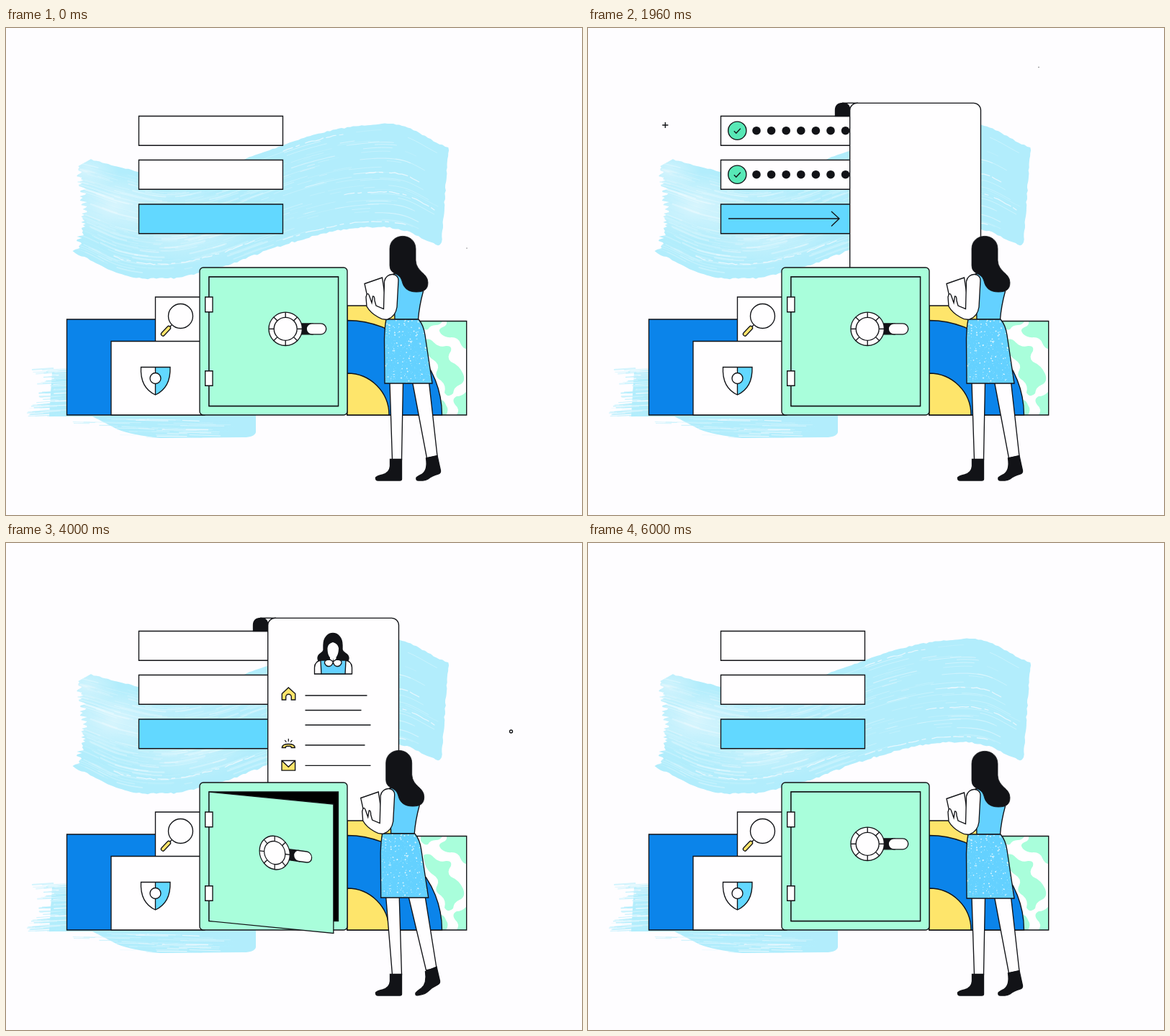
Recreate the animation shown at these times as an HTML page with a canvas. Size 800 by 677 pixels, loop 6040 ms.

```html
<!DOCTYPE html>
<html lang="en">
<head>
<meta charset="utf-8">
<title>Safe deposit</title>
<style>
html, body { margin: 0; width: 100%; height: 100%; overflow: hidden; background: #fefdff; }
canvas { display: block; }
</style>
</head>
<body>
<canvas id="stage" width="800" height="677"></canvas>
<script>
const LOOP = 6040, TAU = Math.PI * 2;
const INK = '#121317', WHITE = '#fffeff', PAGE = '#fefdff', MINT = '#a9fedb', BLUE = '#0b84ea',
      SKY = '#62d8ff', DRESS = '#64d1ff', YELLOW = '#fee56b', WASH = '#b2edfc';
const stage = document.getElementById('stage');
let c = stage.getContext('2d');

// Easing: progress between two times, smoothed
const span = (t, a, b) => Math.min(1, Math.max(0, (t - a) / (b - a)));
const ease = (t, a, b) => {
  const p = span(t, a, b);
  return p < .5 ? 4 * p ** 3 : 1 - 4 * (1 - p) ** 3;
};
const easeOut = (t, a, b) => 1 - (1 - span(t, a, b)) ** 3;

let seed = 7;
const rnd = () => (seed = seed * 16807 % 2147483647) / 2147483647;

function paint(path, fill, line = INK, width = 1.35) {
  const p = typeof path === 'string' ? new Path2D(path) : path;
  if (fill) { c.fillStyle = fill; c.fill(p); }
  if (line) { c.strokeStyle = line; c.lineWidth = width; c.stroke(p); }
}
function box(x, y, w, h, fill, r = 0, line = INK) {
  const p = new Path2D();
  p.roundRect(x, y, w, h, r);
  paint(p, fill, line);
}
function disc(x, y, r, fill, line = INK) {
  const p = new Path2D();
  p.arc(x, y, Math.max(0, r), 0, TAU);
  paint(p, fill, line);
}
function group(draw, x = 0, y = 0, sx = 1, sy = sx) {
  c.save();
  c.translate(x, y);
  c.scale(sx, sy);
  draw();
  c.restore();
}

// Smooth curve through evenly spaced heights
const curve = ys => x => {
  const u = Math.min(7.999, Math.max(0, (x - 95) / 65)), i = Math.floor(u), f = u - i;
  const b = ys[i], d = ys[i + 1], a = ys[i - 1] ?? b, e = ys[i + 2] ?? d;
  return b + .5 * f * (d - a + f * (2 * a - 5 * b + 4 * d - e + f * (3 * (b - d) + e - a)));
};
const ribbonTop = curve([178, 193, 207, 195, 173, 150, 136, 135, 165]);
const ribbonEnd = curve([312, 341, 347, 334, 311, 290, 277, 279, 308]);

// Line that follows the ribbon at depth v, 0 at its top and 1 at its bottom
function along(v, x0, x1, wobble = 0) {
  const p = new Path2D();
  for (let x = x0; x < x1; x += 5) {
    const a = ribbonTop(x), b = ribbonEnd(x);
    p.lineTo(x, a + (b - a) * v + rnd() * wobble);
  }
  return p;
}

function brushLayer() {
  const layer = new OffscreenCanvas(800, 677), main = c;
  c = layer.getContext('2d');

  const ribbon = new Path2D();
  for (let x = 118; x <= 612; x += 4) ribbon.lineTo(x, ribbonTop(x) + rnd() * 1.5);
  for (let y = 166; y < 300; y += 4) ribbon.lineTo(614 - (y - 166) * .075 + rnd() * 1.5, y);
  ribbon.quadraticCurveTo(601, 306, 594, 299);
  for (let x = 585; x >= 95; x -= 4) ribbon.lineTo(x, ribbonEnd(x) + rnd() * 2.5);
  for (let y = 310; y > 190; y -= 2) ribbon.lineTo(91 + rnd() * 11 + 12 * Math.sin((312 - y) / 40), y);
  paint(ribbon, WASH, null);

  c.save();
  c.clip(ribbon);
  c.lineCap = 'round';

  // worn paint, palest in the middle of the left half
  for (const [x, y, r, alpha] of [[150, 248, 80, .5], [250, 275, 95, .38], [112, 200, 45, .45]]) {
    const glow = c.createRadialGradient(0, 0, 0, 0, 0, r);
    glow.addColorStop(0, `rgba(254,253,255,${alpha})`);
    glow.addColorStop(1, 'rgba(254,253,255,0)');
    c.fillStyle = glow;
    c.save();
    c.translate(x, y);
    c.scale(1, .6);
    c.fillRect(-r, -r, 2 * r, 2 * r);
    c.restore();
  }
  for (let i = 0; i < 420; i++) {
    const left = rnd() < .8, x = left ? 90 + rnd() * 250 : 320 + rnd() * 240;
    c.globalAlpha = left ? .08 + rnd() * .22 : .12 + rnd() * .3;
    const line = along(.05 + rnd() * .92, x, x + 12 + rnd() * 60);
    paint(line, null, left && i % 3 == 0 ? WASH : PAGE, .5 + rnd() * (left ? 2 : .7));
  }
  // long dry streaks
  c.globalAlpha = .7;
  c.setLineDash([14, 5, 5, 9, 26, 4]);
  for (const [v, x0, x1] of [[.06, 385, 480], [.47, 500, 580], [.66, 470, 600], [.95, 385, 560], [.86, 150, 350]])
    paint(along(v, x0, x1, 1.5), null, PAGE, 1.2);
  c.restore();

  // lower stroke, with ragged bristles on the left and below
  paint('M64 478 L90 474 V535 H347 V562 Q345 569 330 569 L215 570 Q175 566 155 558 L120 540 H60Z', WASH, null);
  for (let i = 0; i < 110; i++) {
    const y = 474 + rnd() * 66, x = 28 + rnd() * 34 + 16 * Math.max(0, Math.sin((y - 470) / 20));
    c.globalAlpha = .25 + rnd() * .6;
    paint(`M${x} ${y} L${x + 22 + rnd() * 40} ${y - 2}`, null, rnd() < .7 ? WASH : PAGE, .6 + rnd() * 1.6);
  }
  for (let i = 0; i < 70; i++) {
    const x = 90 + rnd() * 180, y = 541 + rnd() * (x < 150 ? 12 : 28);
    c.globalAlpha = .2 + rnd() * .5;
    paint(`M${x} ${y} l${15 + rnd() * 50} ${rnd() * 2}`, null, i % 2 ? WASH : PAGE, .5 + rnd());
  }
  c = main;
  return layer;
}
const brush = brushLayer();

const skirt = new Path2D('M528 405 H573 Q580 413 582 427 L592 494 H526 L525.5 432 Q526 415 528 405Z');
const specks = Array.from({ length: 420 }, () => [525 + rnd() * 67, 406 + rnd() * 87, .2 + rnd() ** 3 * .9]);

function fields(t) {
  [122.5, 183.5, 245].forEach((y, i) => box(184.5, y, 200, 40.7, i < 2 ? WHITE : SKY));

  for (let row = 0; row < 2; row++) {
    const y = 142.7 + row * 61, lag = row * 95;
    for (let i = 0; i < 8; i++) {
      const size = easeOut(t, 120 + i * 65 + lag, 320 + i * 65 + lag) *
                   (1 - ease(t, 3340 + i * 35, 3620 + i * 35));
      const start = 1104 - i * 45 + lag;
      if (size > 0) disc(207 + 20.6 * i + 27 * ease(t, start, start + 600), y, 5.8 * size, INK, null);
    }
    const grow = easeOut(t, 1420 + lag, 1760 + lag) * (1 - ease(t, 3300 + lag, 3680 + lag));
    if (grow > 0) group(() => {
      disc(0, 0, 12.6, '#58e8b6');
      const tick = 1 - .8 * ease(t, 3120, 3520);
      group(() => paint('M-4.5 .5 L-1.5 3.5 L4.5 -3', null), 0, 0, tick);
    }, 207.3, y, grow);
  }

  const enter = easeOut(t, 660, 1460), leave = span(t, 2350, 3000) ** 2;
  if (enter > 0 && leave < 1) {
    c.save();
    c.beginPath();
    c.rect(185, 246, 199, 39);
    c.clip();
    c.translate(-168 * (1 - enter) + 200 * leave, 0);
    paint('M195 265 H349 M338 255 L349 265 L338 275.5', null);
    c.restore();
  }
}

function portrait(t) {
  const p = ease(t, 3220, 3820);
  if (p > 0) {
    c.save();
    c.beginPath();
    c.rect(420, 120, 70, 62.5);
    c.clip();
    c.translate(0, 60 * (1 - p));
    paint('M441 149 V142 C441 120 467 120 467 142 V148 C468 154 476 153 476 160 C476 166 469 168 460 168 H448 C440 168 433 166 433 160 C433 153 440 154 441 149Z', INK);
    paint('M428.5 183 V173 Q429 164 438 163 H471 Q480 164 480.5 173 V183Z', WHITE);
    paint('M438 183 L437 163 H472 L471 183Z', DRESS);
    paint('M446.5 146 Q447 140 454 138 Q461 140 462 146 C462 153 460 157 458.5 159 V166 H450 V159 C448 157 446.5 153 446.5 146Z', WHITE, null);
    paint('M450 162 L454.3 165 L458.5 162 Q467 162 466 167 Q464 172 459.5 171.5 Q455 170.5 454.3 165 Q453.5 170.5 449 171.5 Q444.5 172 442.5 167 Q442 162 450 162Z', WHITE);
    c.restore();
  }
  const w = 52.5 * ease(t, 2770, 3370);
  if (w > 0) paint(`M428 182 h${w}`, null);
}

const rows = [[212, 86, 2560], [232.5, 78, 2660], [253, 91, 2772], [281, 83, 2886], [309.3, 91, 2952]];
const icons = [
  [210, 2540, () => paint('M-9 -.5 L0 -9 L9.5 -.5 V8 H4 V4 A3.6 3.6 0 0 0 -3.6 4 V8 H-9Z', YELLOW)],
  [281, 2780, () => {
    paint('M-9 3.5 Q-9 -1.5 0 -1.5 Q9 -1.5 9 3.5 H4 Q4 1.5 2 1.5 H-2 Q-4 1.5 -4 3.5Z', YELLOW);
    paint('M-5 -7 l2 3 M0 -9 v4 M5 -7 l-2 3', null, INK, 1.2);
  }],
  [309.3, 2980, () => paint('M-9.3 -6.8 H9.3 V6.8 H-9.3Z L0 2 L9.3 -6.8', YELLOW)]
];

function paper(t) {
  const drop = 234 * (1 - ease(t, 40, 640) + span(t, 5160, 5765) ** 2.24);
  if (drop >= 233) return;
  const top = 104.3 + drop, fold = Math.max(0, 1 - drop / 18), r = 10 * fold;
  if (fold > 0) paint(`M343.5 122.5 V${top + r} Q343.5 ${top} 354 ${top} Q363.7 ${top} 363.7 ${top + r} V122.5Z`, INK);
  box(363.7, top, 181.8, 420 - top, WHITE, [r, r, 0, 0]);
  if (fold > 0) paint(`M353 ${top} H375`, null);
  if (t < 2500) return;
  group(() => {
    portrait(t);
    for (const [y, w, start] of rows) {
      const p = ease(t, start, start + 600);
      if (p > 0) paint(`M415.5 ${y} h${w * p}`, null);
    }
    for (const [y, start, draw] of icons) {
      const p = ease(t, start, start + 420);
      if (p > 0) group(draw, 392.3, y, p);
    }
  }, 0, drop);
}

function boxes() {
  box(84.5, 405, 190, 133, BLUE);
  box(207.5, 374, 70, 62, WHITE);
  box(146, 435.5, 130, 102.5, WHITE);
  paint('M230 413 L225 418', null);
  disc(242.5, 400.5, 17, WHITE);
  c.lineCap = 'round';
  paint('M218 425.5 L226 417', null, INK, 6.4);
  paint('M218 425.5 L226 417', null, YELLOW, 3.8);
  c.lineCap = 'butt';
  paint('M207.5 471.5 H228 Q229 500 207.5 510Z', SKY, null);
  paint('M187.5 471.5 H228 Q229 500 207.5 510 Q186 500 187.5 471.5Z M207.5 471.5 V510', null);
  disc(207.5, 487, 7.5, WHITE);

  box(540, 407.5, 99.7, 130.5, WHITE, 0, null);
  paint('M576 408 H606 Q603 413 597 413 Q589 413 586 419 Q581 421 576 414Z', MINT, null);
  paint('M612 408 H639 V446 Q634 445 631 438 Q628 430 619 430 Q610 431 604 425 Q599 419 606 416 Q613 414 612 408Z', MINT, null);
  paint('M580 434 Q588 430 594 437 Q602 445 611 442 Q620 441 618 449 Q611 458 618 464 Q630 469 635 481 Q639 492 630 496 Q622 499 621 508 Q614 515 609 507 Q612 497 604 490 Q594 484 599 476 Q603 467 593 461 Q580 452 580 434Z', MINT, null);
  paint('M639 506 V538 H626 Q631 530 624 524 Q618 516 626 512 Q633 512 639 506Z', MINT, null);
  paint('M600 517 Q608 515 611 524 Q616 531 611 538 H604Z', MINT, null);
  box(540, 407.5, 99.7, 130.5, null);
  box(474, 386, 72, 152, YELLOW);
  paint('M474 406.5 A131.5 131.5 0 0 1 605.5 538 H474Z', BLUE);
  paint('M474 480 A58 58 0 0 1 532 538 H474Z', YELLOW);
}

function safe(t) {
  const open = (ease(t, 3580, 4020) + .1 * span(t, 4020, 5480)) * (1 - ease(t, 5490, 5960));
  box(269, 333, 205, 205, MINT, 5);
  box(282, 346, 179.5, 179.5, '#000');
  c.save();
  c.translate(282, 346);
  c.transform(1 - .037 * open, .095 * open, 0, 1, 0, 0);
  box(0, 0, 179.5, 179.5, MINT);
  c.restore();

  c.save();
  c.translate(388.2 - 15 * open, 418.3 + 12.3 * open);
  c.transform(1 - .09 * open, .12 * open, 0, 1, 0, 0);
  c.rotate(TAU * ease(t, 3120, 3720));
  box(20, -7.5, 18, 15, INK);
  box(29, -7.5, 27.5, 15, WHITE, 7.5);
  disc(0, 0, 23.2, WHITE);
  for (let i = 0; i < 8; i++) {
    const x = Math.cos(i * TAU / 8), y = Math.sin(i * TAU / 8);
    paint(`M${16 * x} ${16 * y} L${23 * x} ${23 * y}`, null);
  }
  disc(0, 0, 16, WHITE);
  c.restore();

  box(276.7, 374, 10.3, 20.7, WHITE);
  box(276.7, 476.7, 10.3, 20.5, WHITE);
}

function woman(t) {
  const lean = ease(t, 3260, 3960) * (1 - .15 * span(t, 4300, 5480)) * (1 - ease(t, 5500, 5985));
  const s = 5.3 * lean, lift = 4 * lean;
  paint(`M${533 - s} 492 L536.5 600 H549.5 L${551.5 - s} 492Z`, WHITE);
  paint(`M${564.5 - s} 492 L${584.5 - lean} ${598 - lift} L${599 - lean} ${595 - lift} L${587.5 - s} 492Z`, WHITE);
  paint('M533.5 599.5 H549.5 V627 Q549.5 629 547 629 H517 Q513 629 513.5 625 Q515 623 523 621 Q533 618 533.5 609Z', INK);
  c.save();
  c.transform(1, -.2 * lean, 0, 1, -lean, 572 * .2 * lean);
  paint('M583.5 598 L599 594.5 L603.5 615 Q604 619 600 620 Q592 622 586 627 Q583 629 579 629 H573 Q569 629 570 625 Q572 623 578 620 Q586 615 583.5 598Z', INK);
  c.restore();

  group(() => {
    paint('M538 342 Q552 338 562 345 L579.5 366 Q574 386 572.5 405 H540 Z', DRESS);
    paint(skirt, DRESS, null);
    c.save();
    c.clip(skirt);
    for (const [x, y, r] of specks) disc(x, y, r, '#d9f5ff', null);
    c.restore();
    paint(skirt, null);
    paint('M498 355.5 L522.5 347 L528 383 L525 391 L504 383Z', WHITE);
    paint('M525.5 352 C528 340 545 339 545 351 L543 388 Q541 401 530 405 Q523 406 517 402 Q506 396 501 387 L500 374 Q502 366 504.5 372 L508 382 L509.5 373 Q512 372 512 379 L514 386 L524.5 390.5Z', WHITE);
    paint('M533 307 C533 283.5 569 283.5 569 307 V323 C570 340 586 340 586 354 C586 364 580 367 570 367 C558 367 552 361 550 352 C547 339 533 344 533 330Z', INK, INK, .8);
  }, -s, -lean);
}

// kind, x, y, start, duration, size, rise
const sparks = [
  ['dot', 640, 306, 6000, 400, 1.8, 0], ['dot', 640, 306, 2020, 460, 1.8, 0],
  ['dot', 85, 375, 60, 560, 1.8, 0], ['ring', 701.5, 262, 60, 560, 4, 0],
  ['ring', 711.5, 97, 700, 720, 4.5, 0], ['plus', 626, 92, 1240, 730, 4.5, 38],
  ['plus', 107.3, 135, 1560, 1000, 4.3, 0], ['ring', 61, 400, 2320, 760, 4.3, 0],
  ['dot', 84.3, 375, 3040, 460, 1.7, 0], ['ring', 701.5, 262, 3900, 600, 4, 0],
  ['plus', 614, 114, 4520, 600, 4, 0], ['ring', 61, 400, 4800, 700, 4.3, 0],
  ['dot', 629, 70, 5380, 520, 2.6, 15]
];
function sparkle(t) {
  for (const [kind, x, y0, start, life, size, rise] of sparks) {
    const p = (t - start + LOOP) % LOOP / life;
    if (p <= 0 || p >= 1) continue;
    const r = size * Math.sin(Math.PI * p), y = y0 - rise * p;
    if (kind === 'plus') paint(`M${x - r} ${y} h${2 * r} M${x} ${y - r} v${2 * r}`, null);
    else disc(x, y, r, kind === 'dot' ? INK : null, kind === 'dot' ? null : INK);
  }
}

function frame(now) {
  const t = now % LOOP;
  c.fillStyle = PAGE;
  c.fillRect(0, 0, 800, 677);
  c.drawImage(brush, 0, 0);
  fields(t);
  paper(t);
  boxes();
  safe(t);
  woman(t);
  sparkle(t);
}
let begin;
function tick(now) {
  begin ??= now;
  frame(now - begin);
  requestAnimationFrame(tick);
}
frame(0);
requestAnimationFrame(tick);
</script>
</body>
</html>
```
